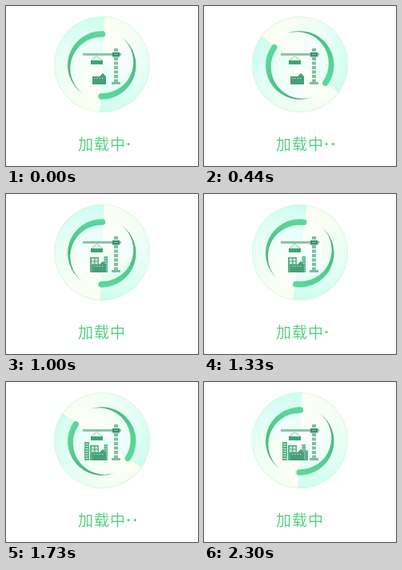
An HTML page that plays this animation: 240 by 200 pixels, repeating every 2600 ms.

```html
<!DOCTYPE html>
<html lang="zh-CN">
<head>
<meta charset="utf-8">
<title>加载中</title>
<style>
  html, body { margin: 0; width: 100%; height: 100%; overflow: hidden; background: #fff; }
  #stage { position: relative; width: 240px; height: 200px; overflow: hidden; }
  #disc {
    position: absolute; left: 60px; top: 13px; width: 120px; height: 120px;
    box-sizing: border-box; border-radius: 50%;
    border: 1px solid rgba(214, 245, 218, .75);
    background:
      radial-gradient(circle, rgba(255,255,255,.6) 0 30%, rgba(255,255,255,0) 70%) border-box,
      repeating-conic-gradient(#fdfef0 0deg, #f3fef4 45deg, #e3fef4 95deg, #d2fef2 145deg, #cafdee 180deg) border-box;
  }
  svg { position: absolute; left: 0; top: 0; }
  text {
    font: 19px "Noto Sans CJK SC", "Noto Sans CJK", sans-serif;
    letter-spacing: 1px; fill: #57cf80;
  }
</style>
</head>
<body>
<div id="stage">
  <div id="disc"></div>
  <svg width="240" height="200" viewBox="0 0 240 200">
    <defs>
      <linearGradient id="fade" x1="0" y1="0" x2="0" y2="1">
        <stop offset="0" stop-color="#4aa46c"/>
        <stop offset=".5" stop-color="#4dc082"/>
        <stop offset="1" stop-color="#5cda9f"/>
      </linearGradient>
      <path id="arc" fill="url(#fade)"
        d="M23-36A42.7 42.7 0 0 1 1 42.7A3.7 3.7 0 0 1 1 35.3A39.4 39.4 0 0 0 23-36Z"/>
    </defs>
    <g id="arcs">
      <use href="#arc"/>
      <use href="#arc" transform="rotate(180)"/>
    </g>

    <g id="crane">
      <path d="M96 60.5H144" stroke="#8cc4a8" stroke-width="3"/>
      <path d="M137.5 53V95" stroke="#84bd9f" stroke-width="5" stroke-dasharray="4 1.5"/>
      <path d="M132 96.5H143" stroke="#80bd9e" stroke-width="3"/>
      <path d="M133 58H142V63.5H133Z" fill="#388f66"/>
      <path d="M135 60.5H140" stroke="#8cc8ab"/>
      <path d="M107 68L113.5 62.5L120 68" fill="none" stroke="#76b698" stroke-width=".9"/>
      <path d="M106 68H121V73H106Z" fill="#3da674"/>
    </g>

    <g class="part">
      <path d="M98 75H104V98H98Z" fill="#55b386"/>
      <path d="M101 77V96" stroke="#c4ead8" stroke-width="4" stroke-dasharray="1 2"/>
    </g>
    <g class="part">
      <path d="M105 79H116V98H105Z" fill="#5bb189"/>
      <path d="M107 80.7H110V83.5H107ZM111.5 80.7H114.5V83.5H111.5ZM107 84.7H110V87.5H107ZM111.5 84.7H114.5V87.5H111.5Z" fill="#d3f1e3"/>
    </g>
    <g class="part">
      <path d="M122.5 78H127V98H122.5Z" fill="#62b890"/>
      <path d="M124.8 80V97" stroke="#a9dcc3" stroke-width="2.5" stroke-dasharray="1 2"/>
    </g>
    <path class="part" d="M126 85.5H130V98H126Z" fill="#55b386"/>
    <g>
      <path d="M108 88H117L121 84L125 88V98H108Z" fill="#469f77"/>
      <path d="M110 90.3H123" stroke="#c8ebda" stroke-width="1.3" stroke-dasharray="1.3 2"/>
    </g>

    <text x="90" y="180">加载中</text>
    <g fill="#57cf80">
      <circle class="dot" cx="153" cy="172.6" r="1.6"/>
      <circle class="dot" cx="161.3" cy="172.6" r="1.6"/>
      <circle class="dot" cx="169.5" cy="172.6" r="1.6"/>
    </g>
  </svg>
</div>
<script>
  const LOOP = 2600, HALF = 1300, REST_ANGLE = 2.5;
  // time in ms, angle in degrees, speed in degrees per ms
  const TURN = [
    [0, 0, .18], [30, 6, .28], [240, 80.5, .29], [430, 122, .18],
    [720, 161, .09], [1000, 180, 0]
  ];
  const PART_START = [1440, 480, 960, 1920];

  const disc = document.getElementById('disc');
  const arcs = document.getElementById('arcs');
  const parts = document.querySelectorAll('.part');
  const dots = document.querySelectorAll('.dot');

  function angleAt(t) {
    const i = TURN.findIndex(k => k[0] > t);
    if (i < 0) return 180;
    const [t0, a0, v0] = TURN[i - 1], [t1, a1, v1] = TURN[i];
    const d = t1 - t0, u = (t - t0) / d, w = 1 - u;
    return w * w * (1 + 2 * u) * a0 + u * u * (3 - 2 * u) * a1
         + d * u * w * (w * v0 - u * v1);
  }

  const show = (el, on) => { el.style.visibility = on ? 'visible' : 'hidden'; };

  function draw(t) {
    const phase = t % HALF;
    const resting = t >= HALF && phase < 30;
    const angle = REST_ANGLE + (resting ? 0 : angleAt(phase));
    disc.style.transform = `rotate(${angle}deg)`;
    arcs.setAttribute('transform', `translate(119.8 74) rotate(${angle})`);
    parts.forEach((p, i) => show(p, t >= PART_START[i]));
    const count = resting || phase >= 1000 ? 0 : 1 + Math.floor(phase / 334);
    dots.forEach((d, i) => show(d, i < count));
  }

  const start = performance.now();
  function tick(now) {
    draw(Math.max(0, now - start) % LOOP);
    requestAnimationFrame(tick);
  }
  draw(0);
  requestAnimationFrame(tick);
</script>
</body>
</html>
```
